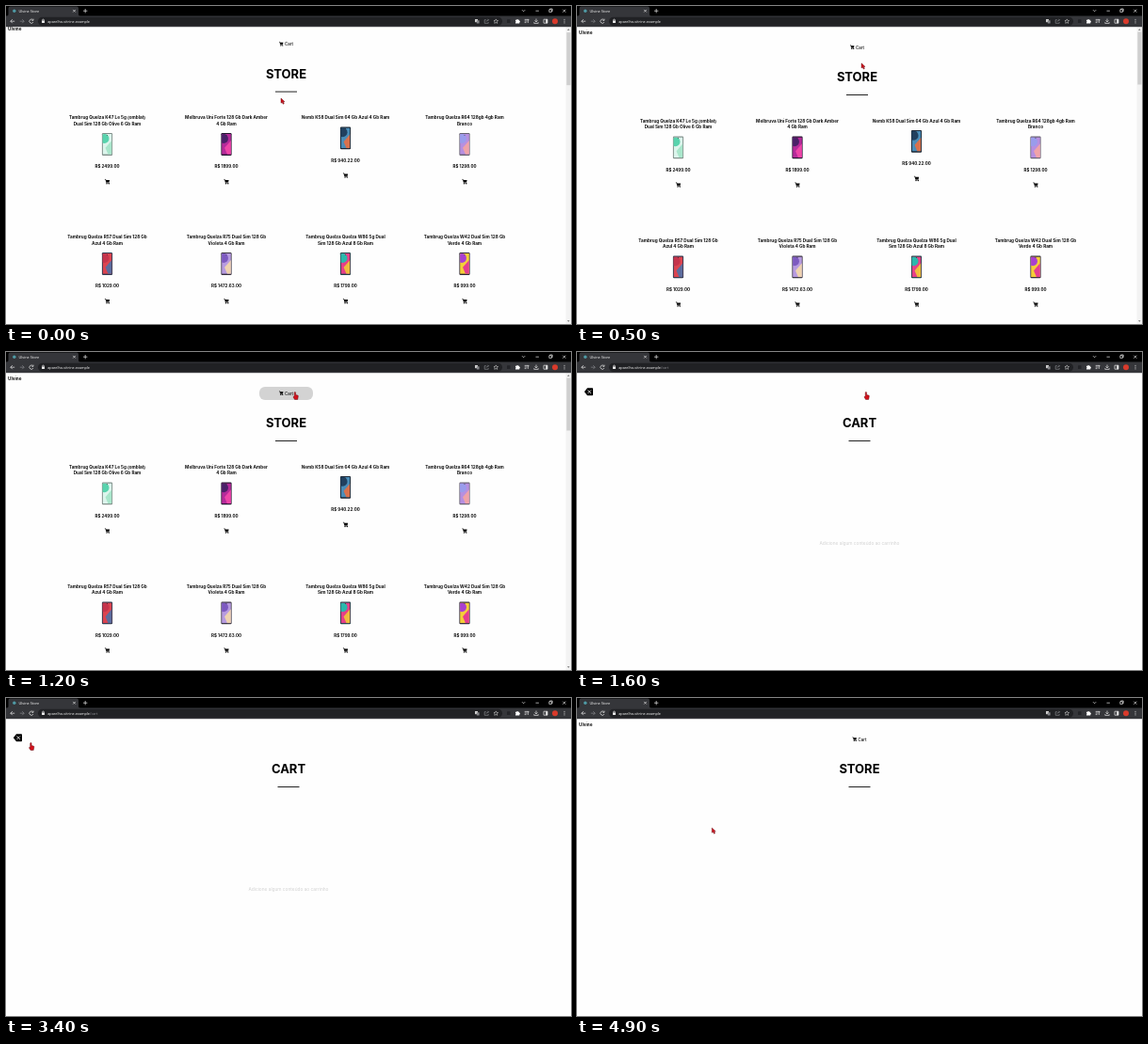
These frames come from a looping animation (600x338 px, 5000 ms). An HTML page:

```html
<!DOCTYPE html>
<html lang="pt">
<head>
<meta charset="utf-8">
<title>Ulvine Store</title>
<style>
  html, body { margin: 0; width: 100%; height: 100%; overflow: hidden; background: #fefefe; }
  svg { display: block; }
  #stage { width: 100vw; height: 100vh; }
  text { font: 700 4.65px Inter, sans-serif; fill: #111; }
  .mid { text-anchor: middle; }
  .price { font-size: 4.5px; }
  .heading { font-size: 13px; fill: #000; }
  .empty { font-size: 4.8px; font-weight: 400; fill: #d2d2d2; }
  .ui { font: 400 3.85px "Open Sans", sans-serif; fill: #fff; }
  .line { fill: none; stroke: #e8e8e8; stroke-width: .7; }
  .dim { stroke: #85868a; }
</style>
</head>
<body>
<svg id="stage" viewBox="0 0 600 338">
  <defs>
    <g id="cart">
      <path d="M-2.6-2.3H-1.6L-.7 1.2H2.2" fill="none" stroke="#000" stroke-width=".7"/>
      <path d="M-1.5-1.7H2.6L2.1.6H-.9Z"/>
      <circle cx="-.5" cy="2" r=".7"/><circle cx="1.8" cy="2" r=".7"/>
    </g>
  </defs>

  <g id="store">
    <text x="2" y="29.5">Ulvine</text>
    <g id="header">
      <rect id="hover" x="269" y="37" width="57" height="14" rx="6" fill="#d3d3d3"/>
      <use href="#cart" transform="translate(292.2 43.7) scale(.85)"/>
      <text x="296" y="45.6" style="font-size:4.4px;font-weight:500">Cart</text>
      <text class="mid heading" x="297.5" y="80.2">STORE</text>
      <rect x="286" y="94" width="23" height="1" fill="#222"/>
    </g>
    <g id="products"></g>
  </g>

  <g id="cartPage">
    <path d="M7.8 42.2L11 38.2H16.2Q17 38.2 17 39V45.4Q17 46.2 16.2 46.2H11Z"/>
    <path d="M11.5 40.5L15 44M15 40.5L11.5 44" stroke="#fff" stroke-width=".8"/>
    <text class="mid heading" x="300" y="80.2">CART</text>
    <rect x="288.5" y="94" width="23" height="1" fill="#222"/>
    <text class="mid empty" x="300" y="205.2">Adicione algum conteúdo ao carrinho</text>
  </g>

  <g id="scrollbar">
    <rect x="594.5" y="22" width="5.5" height="316" fill="#f3f3f3"/>
    <rect id="thumb" x="595.3" y="27.5" width="4.2" height="56" fill="#cfcfcf"/>
    <path d="M596 25.7l1.3-1.4 1.3 1.4zM596 334.3l1.3 1.4 1.3-1.4z" fill="#666"/>
  </g>

  <g id="browser">
    <rect width="600" height="11"/>
    <rect y="10.5" width="600" height="11.7" fill="#35363a"/>
    <path d="M0 11Q2.5 11 2.5 8.5V2.5Q2.5.5 4.5.5H75Q77 .5 77 2.5V8.5Q77 11 79.5 11Z" fill="#35363a"/>
    <circle cx="8.8" cy="5.2" r="1.7" fill="#4f9aa5"/>
    <text class="ui" x="13.5" y="6.7">Ulvine Store</text>
    <path class="line" d="M71.2 3.9l2.6 2.6m0-2.6l-2.6 2.6M82 5.2h4.4m-2.2-2.2v4.4
      M548 4.2l1.6 1.6 1.6-1.6M562.5 5.2h3.4M576.8 3.8h2.6v2.6h-2.6zm.8 0v-.8h2.6v2.6h-.8M591.3 3.7l3 3m0-3l-3 3"/>
    <path class="line" d="M9.2 16.2H4.8m2-2l-2 2 2 2M28.7 15a2.1 2.1 0 1 0 .2 2M29 13.6v1.7h-1.7"/>
    <path class="line dim" d="M14.8 16.2h4.4m-2-2l2 2-2 2"/>
    <rect x="34" y="11.8" width="493" height="9" rx="4.5" fill="#202124"/>
    <path class="line" d="M38.6 15.8v-.8a.9.9 0 0 1 1.8 0v.8"/>
    <rect x="38" y="15.6" width="3" height="2.4" rx=".3" fill="#e8e8e8"/>
    <text class="ui" x="44.2" y="17.6">aparelho-vitrine.example<tspan id="path" fill="#909196">/cart</tspan></text>
    <rect x="498" y="14" width="3" height="3.2" fill="#ccc"/>
    <rect x="499.8" y="15.3" width="2.8" height="3.2" fill="#85868a"/>
    <path class="line dim" d="M509.8 14.7h-1.6v3.6h4v-1.3M510 16.7q.5-1.9 2.5-1.9m-1-1l1 1-1 1"/>
    <path class="line" style="stroke-width:.5" d="M520.3 13.9l.7 1.5 1.6.2-1.2 1.1.3 1.7-1.4-.9-1.5.9.3-1.7-1.1-1.1 1.6-.2z"/>
    <rect x="532" y="14.3" width="3.5" height="3.7" rx=".5" fill="#222327"/>
    <path d="M541 14.7h1.3a.8.8 0 0 1 1.6 0h1.3v1.2a.8.8 0 0 1 0 1.6v1.1H541v-1.2a.8.8 0 0 0 0-1.5z" fill="#fff"/>
    <path class="line" d="M550.7 14.4h4.4M550.7 16h2.6M550.7 17.6h1.8M554.3 18v-3.2h1.2
      M563 13.5v3.4m-1.5-1.5l1.5 1.5 1.5-1.5M560.8 17.2v1.2h4.4v-1.2M571 14.2h4v4h-4z"/>
    <rect x="573.2" y="14.2" width="1.8" height="4" fill="#e8e8e8"/>
    <circle cx="583" cy="16.2" r="3" fill="#d93a2b"/>
    <path d="M593 14.3v.1m0 1.7v.1m0 1.7v.1" stroke="#eee" stroke-width=".9" stroke-linecap="round"/>
  </g>

  <g id="cursor" fill="#d4101b" stroke="#4a0508" stroke-width=".4" stroke-linejoin="round">
    <path id="arrow" d="M0 0V5.2L1.2 4.2 2.2 6.3 3.3 5.8 2.4 3.8H4Z"/>
    <path id="hand" d="M-.8.7a.7.7 0 0 1 1.4 0V3L2.8 3.5Q3.5 3.8 3.3 5L2.7 8H-.4L-2 5.4Q-1.9 4.4-.8 5Z"/>
  </g>
</svg>
<script>
const $ = id => document.getElementById(id);

// Title lines, price, then wallpaper colours: frame, base, upper shape, lower shape
const products = [
  [['Tambrug Quelza K47 Le 5g (omblat)', 'Dual Sim 128 Gb Olive 6 Gb Ram'], '2499.00', '#7f8d89', '#dcf5ec', '#58d3ad', '#a9e6cb'],
  [['Melbruva Uni Forte 128 Gb Dark Amber', '4 Gb Ram'], '1899.00', '#21152e', '#b52a9a', '#4a2068', '#ee45a8'],
  [['Nemb K58 Dual Sim 64 Gb Azul 4 Gb Ram'], '940.22.00', '#18222e', '#4a8db8', '#21405f', '#d9714c'],
  [['Tambrug Quelza R64 128gb 4gb Ram', 'Branco'], '1298.00', '#65606f', '#b78fe0', '#9a9cec', '#f0a3a8'],
  [['Tambrug Quelza R57 Dual Sim 128 Gb', 'Azul 4 Gb Ram'], '1029.00', '#2f3c52', '#dc4450', '#c5344c', '#5c6c9e'],
  [['Tambrug Quelza R75 Dual Sim 128 Gb', 'Violeta 4 Gb Ram'], '1472.63.00', '#37313e', '#b79be0', '#7d5ac0', '#efd3b0'],
  [['Tambrug Quelza Quelza W86 5g Dual', 'Sim 128 Gb Azul 8 Gb Ram'], '1799.00', '#23434b', '#e63f88', '#2bb8ac', '#efbd3d'],
  [['Tambrug Quelza W42 Dual Sim 128 Gb', 'Verde 4 Gb Ram'], '999.00', '#2d2738', '#f5cf38', '#a93fd0', '#e53d90'],
];

function productMarkup([lines, price, frame, base, upper, lower], i) {
  const x = 107.5 + 126.5 * (i % 4), y = 123.5 + 127 * Math.floor(i / 4);
  const end = y + 6.6 * (lines.length - 1);
  const titles = lines.map((line, n) => `<text class="mid" x="${x}" y="${y + 6.6 * n}">${line}</text>`).join('');
  return `${titles}
    <rect x="${x - 5.6}" y="${end + 8.4}" width="11.2" height="23.8" rx="1.2" fill="${frame}"/>
    <svg x="${x - 4.9}" y="${end + 9.3}" width="9.8" height="21.8" viewBox="0 0 10 22" preserveAspectRatio="none">
      <rect width="10" height="22" fill="${base}"/>
      <circle cx="2" cy="5" r="5" fill="${upper}"/>
      <path d="M10 7L3 15 6 22H10Z" fill="${lower}"/>
      <circle cx="5" cy="1.2" r=".5" fill="#222"/>
    </svg>
    <text class="mid price" x="${x}" y="${end + 45.8}">R$ ${price}</text>
    <use href="#cart" x="${x}" y="${end + 60}"/>`;
}
$('products').innerHTML = products.map(productMarkup).join('');

// Cursor hotspot: time, x, y
const stops = [
  [0, 292, 98], [100, 292, 98], [750, 307, 42.5], [2000, 307, 42.5],
  [2350, 255, 118], [2650, 199.5, 98], [2900, 199.5, 98], [3400, 26.5, 47.5],
  [3800, 18, 43], [4600, 18, 43], [4900, 143.3, 138], [5000, 143.3, 138],
];
function cursorAt(t) {
  const i = stops.findIndex(stop => stop[0] > t);
  const [t0, x0, y0] = stops[i - 1], [t1, x1, y1] = stops[i];
  const p = (t - t0) / (t1 - t0), e = p * p * (3 - 2 * p);
  return [x0 + (x1 - x0) * e, y0 + (y1 - y0) * e];
}

const show = (id, on) => $(id).setAttribute('display', on ? 'inline' : 'none');
const move = (id, x, y) => $(id).setAttribute('transform', `translate(${x} ${y})`);

function draw(t) {
  const loaded = t < 1600, inCart = !loaded && t < 4200;
  const scroll = t < 100 ? 3.4 : 0;
  const [x, y] = cursorAt(t);
  const onLink = loaded ? y < 51 : inCart && (t < 2100 || x < 32);

  show('store', !inCart);
  show('cartPage', inCart);
  show('path', inCart);
  show('products', loaded);
  show('scrollbar', loaded);
  show('hand', onLink);
  show('arrow', !onLink);
  move('store', 0, -scroll);
  move('header', loaded ? 0 : 2.5, 0);
  move('thumb', 0, scroll / 5);
  move('cursor', x, y);
  $('hover').setAttribute('opacity', loaded ? Math.min(1, Math.max(0, (t - 500) / 300)) : 0);
}

// The picture advances ten times a second
function tick() {
  draw(Math.floor(performance.now() % 5000 / 100) * 100);
  requestAnimationFrame(tick);
}
tick();
</script>
</body>
</html>
```
